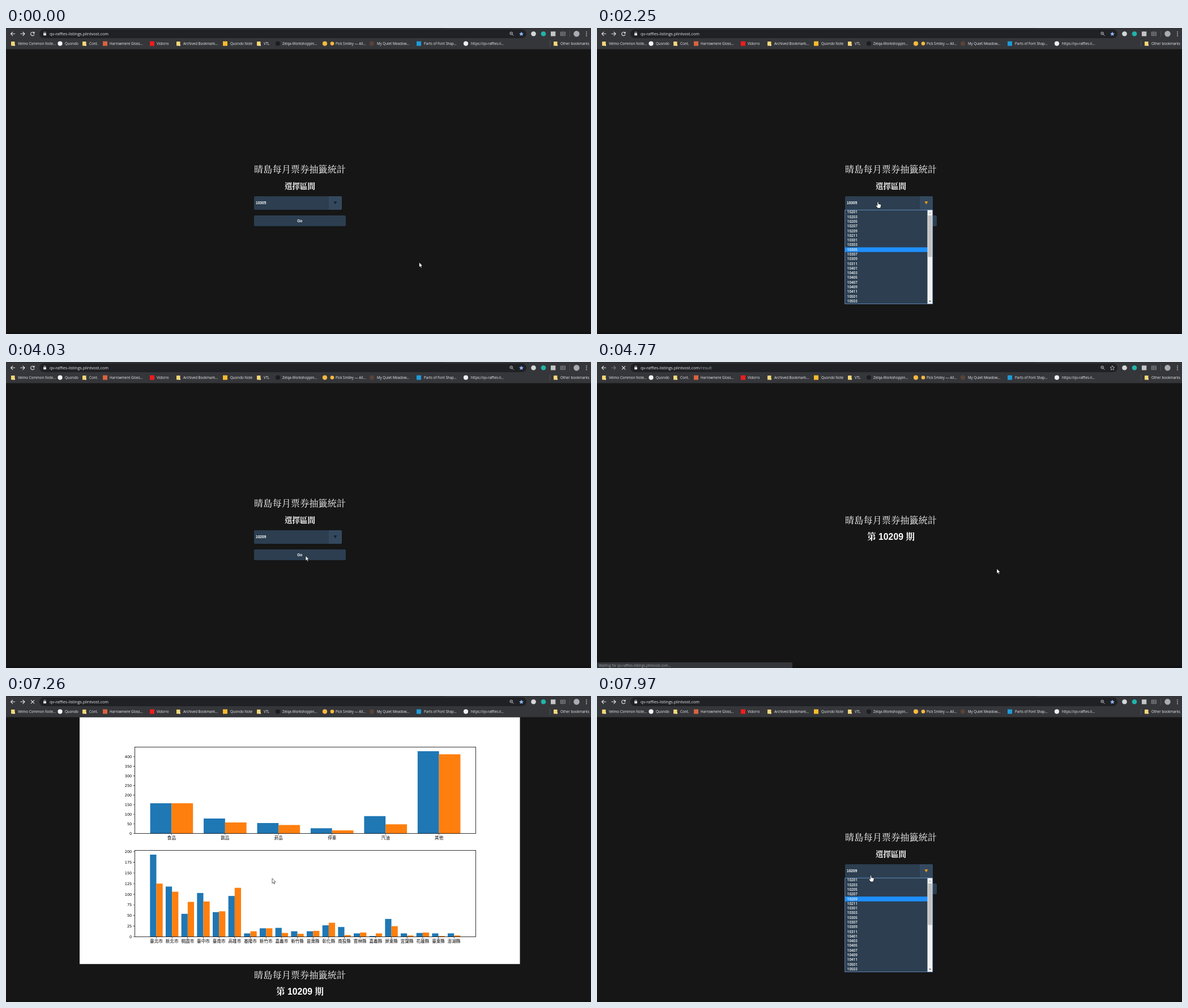
An HTML page with a canvas that plays this animation: 1033 by 542 pixels, repeating every 8 s.

```html
<!DOCTYPE html>
<html lang="zh-Hant">
<head>
<meta charset="utf-8">
<title>Statistics</title>
<style>
html, body { margin: 0; width: 100%; height: 100%; overflow: hidden; background: #161616; }
canvas { display: block; }
</style>
</head>
<body>
<canvas width="1033" height="542"></canvas>
<script>
const ctx = document.querySelector('canvas').getContext('2d');
const LOOP = 8000;
const UI = '"Open Sans", "Noto Sans", sans-serif';
const ARIAL = '"Liberation Sans", Arial, sans-serif';
const PLOT = '"DejaVu Sans", sans-serif';
const MING = '"Noto Serif CJK TC", "Noto Sans CJK TC", "Noto Sans CJK", serif';
const HOST = 'qv-raffles-listings.plintvost.com';
const TITLE = '晴島每月票券抽籤統計';

// Moments of the session, in ms
const OPEN = 2250, PICK = 3770, SUBMIT = 4200, RESULT = 4440, CHART = 5460,
  STATUS_END = 5800, BACK = 6640, COMMIT = 7200, HOME = 7310, READY = 7340, REOPEN = 7780;

// Pointer stops: time, x, y
const stops = [
  [0, 729.5, 415], [630, 729.5, 415], [1420, 496, 307.5], [2520, 496, 307.5],
  [2910, 482, 361], [3770, 482, 361], [4100, 535, 341], [4250, 537, 341],
  [4580, 596, 354], [4770, 706, 366], [5750, 706, 366], [6500, 488, 333],
  [6600, 488, 333], [7200, 470, 323], [7410, 470, 323], [7700, 483.5, 317.5], [LOOP, 483.5, 317.5]
];

const bookmarks = [
  [9, 'folder', '#f8d775', 21, 'Velmo Common Note...'],
  [91.5, 'circle', '#f4f4f4', 104, 'Quondo'],
  [135, 'folder', '#f8d775', 147, 'Cont.'],
  [171, 'square', '#d9633f', 183, 'Harrowmere Gloss...'],
  [254, 'square', '#f01c1c', 266, 'Vidorro'],
  [301, 'folder', '#f8d775', 313, 'Archived Bookmark...'],
  [383, 'square', '#f9bb2d', 396, 'Quondo Note'],
  [443, 'folder', '#f8d775', 455, 'VTL'],
  [476, 'circle', '#1b1d21', 488, 'Zelqa-Workshoppin...'],
  [559, 'circle', '#f7b93e', 582, 'Pick Smiley — All...'],
  [642, 'circle', '#594238', 655, 'My Quiet Meadow...'],
  [725, 'square', '#1d9bd8', 738, 'Parts of Font Shap...'],
  [808, 'circle', '#eceff1', 821, 'https://qv-raffles-li...'],
  [967, 'folder', '#f8d775', 979, 'Other bookmarks']
];

const goods = {
  names: '食品 飲品 菸品 停車 汽油 其他'.split(' '),
  blue: [157, 78, 54, 27, 90, 428],
  orange: [157, 57, 44, 16, 48, 412],
  top: 90.5, base: 243.5, unit: 0.3405, step: 50, max: 400, x: 292.4, pitch: 94.45, bar: 37.8
};
const areas = {
  names: ('臺北市 新北市 桃園市 臺中市 臺南市 高雄市 基隆市 新竹市 嘉義市 新竹縣 ' +
    '苗栗縣 彰化縣 南投縣 雲林縣 嘉義縣 屏東縣 宜蘭縣 花蓮縣 臺東縣 澎湖縣').split(' '),
  blue: [193, 118, 54, 103, 58, 96, 8, 20, 21, 13, 13, 27, 23, 8, 2, 42, 8, 9, 8, 8],
  orange: [125, 106, 82, 83, 60, 115, 13, 20, 9, 7, 14, 33, 4, 10, 8, 25, 3, 10, 2, 3],
  top: 273.5, base: 426.5, unit: 0.7535, step: 25, max: 200, x: 265.5, pitch: 27.67, bar: 11.2
};

const periods = [];
for (let i = 0; i < 20; i++) periods.push(String((102 + Math.floor(i / 6)) * 100 + i % 6 * 2 + 1));
const ROW = 8.29;

function rect(x, y, w, h, color, r = 0) {
  ctx.fillStyle = color;
  ctx.beginPath();
  ctx.roundRect(x, y, w, h, r);
  ctx.fill();
}
function circle(x, y, r, color) {
  ctx.fillStyle = color;
  ctx.beginPath();
  ctx.arc(x, y, r, 0, 7);
  ctx.fill();
}
// y is the middle of the capitals
function text(s, x, y, size, font = UI, color = '#fff', align = 'left', weight = 400) {
  ctx.font = `${weight} ${size}px ${font}`;
  ctx.fillStyle = color;
  ctx.textAlign = align;
  ctx.fillText(s, x, y + size * 0.37);
  return ctx.measureText(s).width;
}
function shape(d, x, y, fill, stroke, width = 1) {
  const p = new Path2D(d);
  ctx.save();
  ctx.translate(x, y);
  if (fill) { ctx.fillStyle = fill; ctx.fill(p); }
  if (stroke) { ctx.strokeStyle = stroke; ctx.lineWidth = width; ctx.stroke(p); }
  ctx.restore();
}

function pointer(t) {
  const i = Math.max(1, stops.findIndex(s => s[0] > t));
  const [t0, x0, y0] = stops[i - 1], [t1, x1, y1] = stops[i];
  const u = (t - t0) / (t1 - t0), e = u * u * (3 - 2 * u);
  return { x: x0 + (x1 - x0) * e, y: y0 + (y1 - y0) * e };
}

function toolbar(t) {
  const result = t >= RESULT && t < COMMIT;
  const loading = t >= SUBMIT && t < CHART || t >= BACK && t < READY;
  const ink = '#e8eaed';
  rect(0, 0, 1033, 37.5, '#35363a');
  rect(0, 0, 776, 1, '#2a2b2e');
  rect(59, 2.5, 860, 15.5, '#202124', 7.75);

  shape('M4 0H-3.5M0 -3.5L-3.5 0L0 3.5', 12, 10.3, null, ink, 1.1);
  shape('M-4 0H3.5M0 -3.5L3.5 0L0 3.5', 29.5, 10.3, null, result ? '#7c7e82' : ink, 1.1);
  if (loading) shape('M-3 -3L3 3M3 -3L-3 3', 47, 10.3, null, ink, 1.1);
  else {
    shape('M2.4 -2A3.2 3.2 0 1 0 3.1 1', 46.8, 10.3, null, ink, 1.1);
    shape('M3.7 -4V-.5H.2Z', 46.8, 10.3, ink);
  }
  shape('M-2.4 -.8H2.4V3.2H-2.4Z', 68.5, 10, ink);
  shape('M-1.4 -.5V-1.7A1.4 1.4 0 0 1 1.4 -1.7V-.5', 68.5, 10, null, ink, 0.8);
  const w = text(HOST, 77, 10.4, 7.2, UI, ink);
  if (result) text('/result', 77 + w, 10.4, 7.2, UI, '#9aa0a6');

  shape('M1.6 -.8A2.4 2.4 0 1 1 -3.2 -.8A2.4 2.4 0 1 1 1.6 -.8M.9 .9L3.5 3.5M-2 -.8H.4', 893, 10.3, null, '#c8cace', 0.9);
  const star = 'M0 -4L1.2 -1.4L4 -1.1L1.9 .8L2.5 3.6L0 2.1L-2.5 3.6L-1.9 .8L-4 -1.1L-1.2 -1.4Z';
  if (result) shape(star, 910, 10.5, null, '#c8cace', 0.8);
  else shape(star, 910, 10.5, '#8ab4f8');

  circle(931.5, 10.3, 4.3, '#d5d6d7');
  circle(949, 10.3, 4.3, '#20b5ab');
  rect(962, 6.2, 8.3, 8.3, '#c4c5c7');
  shape('M-4 -3H4V3H-4ZM-2 -1H0V1H-2ZM2 -1.5V1.5', 983.3, 10.3, null, '#a8aaad', 0.8);
  rect(995, 5, 0.7, 11, '#55575b');
  circle(1007.5, 10.3, 5.2, '#a9adb2');
  for (const y of [7, 10.3, 13.6]) circle(1025, y, 0.85, ink);

  for (const [x, kind, color, tx, label] of bookmarks) {
    if (kind === 'folder') {
      rect(x, 24, 6.5, 7.4, color, 0.6);
      rect(x + 4.8, 29.4, 2.2, 2, '#fff1b8');
    } else if (kind === 'circle') circle(x + 4, 27.6, 4.1, color);
    else rect(x, 23.6, 8, 8, color);
    text(label, tx, 27.5, 6.2, UI, ink);
  }
  circle(576, 27.6, 3.3, '#f7b93e');
  rect(960, 22, 0.7, 11, '#55575b');
}

function heading(y, t) {
  text(TITLE, 519, y, 16.2, MING, '#fff', 'center', 500);
  if (t < RESULT || t >= HOME) text('選擇區間', 519, y + 29.8, 13.5, MING, '#fff', 'center', 700);
  else text('第 10209 期', 519, y + 29, 15.75, `"Liberation Sans", ${MING}`, '#fff', 'center', 700);
}

function home(t, p) {
  const chosen = t < PICK ? 8 : 4;
  const open = t >= OPEN && t < PICK || t >= REOPEN;
  const hover = overSelect(p);
  heading(250, t);
  rect(438, 332, 162, 19, '#2c3e50', 2);
  text('Go', 518.8, 341.3, 6.5, ARIAL, '#fff', 'center', 700);
  rect(438, 298, 155, 24, '#2c3e50', 2);
  rect(570, 298, 23, 24, '#34495e', [0, 2, 2, 0]);
  text(periods[chosen], 441, 310, 6.6, ARIAL, '#fff', 'left', 700);
  shape('M-3 -2.6H3L0 2.8Z', 581.4, 309.8, hover || open ? '#f39c12' : '#17212b');
  if (!open) return;

  rect(437.5, 322, 155.5, 167, '#2c3e50');
  const lit = p.y > 322 ? Math.floor((p.y - 322) / ROW) : chosen;
  rect(438, 322.2 + lit * ROW, 145.5, ROW, '#1e90ff');
  periods.forEach((s, i) => text(s, 441.8, 326.1 + i * ROW, 6.3, UI, '#fff', 'left', 600));
  rect(583.5, 322, 9, 167, '#f1f1f1');
  rect(584.5, 332, 7, 73.5, '#c1c1c1');
  shape('M-2 1H2L0 -1.2Z', 588, 327.7, '#a3a3a3');
  shape('M-2 -1H2L0 1.2Z', 588, 484, '#505050');
  ctx.strokeStyle = '#6f9bd1';
  ctx.lineWidth = 0.8;
  ctx.strokeRect(437.8, 322.3, 154.9, 166.4);
}

function plot(c) {
  const ticks = new Path2D();
  c.names.forEach((name, i) => {
    const x = c.x + i * c.pitch;
    const bar = (left, v, color) => rect(left, c.base - v * c.unit, c.bar, v * c.unit, color);
    bar(x - c.bar, c.blue[i], '#1f77b4');
    bar(x, c.orange[i], '#ff7f0e');
    ticks.rect(x - 0.3, c.base, 0.6, 2.8);
    text(name, x, c.base + 8, 7.6, '"Noto Sans CJK TC", "Noto Sans CJK", sans-serif', '#000', 'center');
  });
  for (let v = 0; v <= c.max; v += c.step) {
    const y = c.base - v * c.unit;
    ticks.rect(224.5, y - 0.3, 3, 0.6);
    text(String(v), 222.3, y, 6.6, PLOT, '#000', 'right');
  }
  ctx.fillStyle = '#000';
  ctx.fill(ticks);
  ctx.strokeStyle = '#000';
  ctx.lineWidth = 0.8;
  ctx.strokeRect(227.5, c.top, 602, c.base - c.top);
}

function result(t) {
  if (t < CHART) return heading(280, t);
  rect(130, 37.5, 777.5, 437.3, '#fff');
  plot(goods);
  plot(areas);
  heading(494, t);
}

function overSelect(p) {
  return p.x > 438 && p.x < 593 && p.y > 298 && p.y < 322;
}

function cursor(t, p) {
  const hand = overSelect(p) && (t < RESULT || t >= HOME);
  shape(hand
    ? 'M-1 .9Q0 -.5 1 .9V4L4.8 4.9Q5.8 5.2 5.7 6.2L5 9.6L4.4 11.6H-.3L-3.4 7.4Q-3.6 6.2 -2.4 6.3L-1 7.4Z'
    : 'M0 0V8.8L2 7L3.4 10L4.8 9.4L3.5 6.5L6 6.3Z', p.x, p.y, '#fff', '#000', 0.6);
}

function draw(now) {
  const t = now % LOOP, p = pointer(t);
  rect(0, 0, 1033, 542, '#161616');
  rect(0, 538, 1033, 4, '#121212');
  if (t < RESULT || t >= HOME) home(t, p);
  else result(t);
  toolbar(t);
  if (t >= SUBMIT && t < STATUS_END) {
    rect(0, 532, 345, 10, '#35363a', [0, 1.5, 0, 0]);
    text(`Waiting for ${HOST}...`, 3, 537.6, 6.2, UI, '#9aa0a6');
  }
  cursor(t, p);
}

const start = performance.now();
function loop() {
  draw(performance.now() - start);
  requestAnimationFrame(loop);
}
loop();
</script>
</body>
</html>
```
